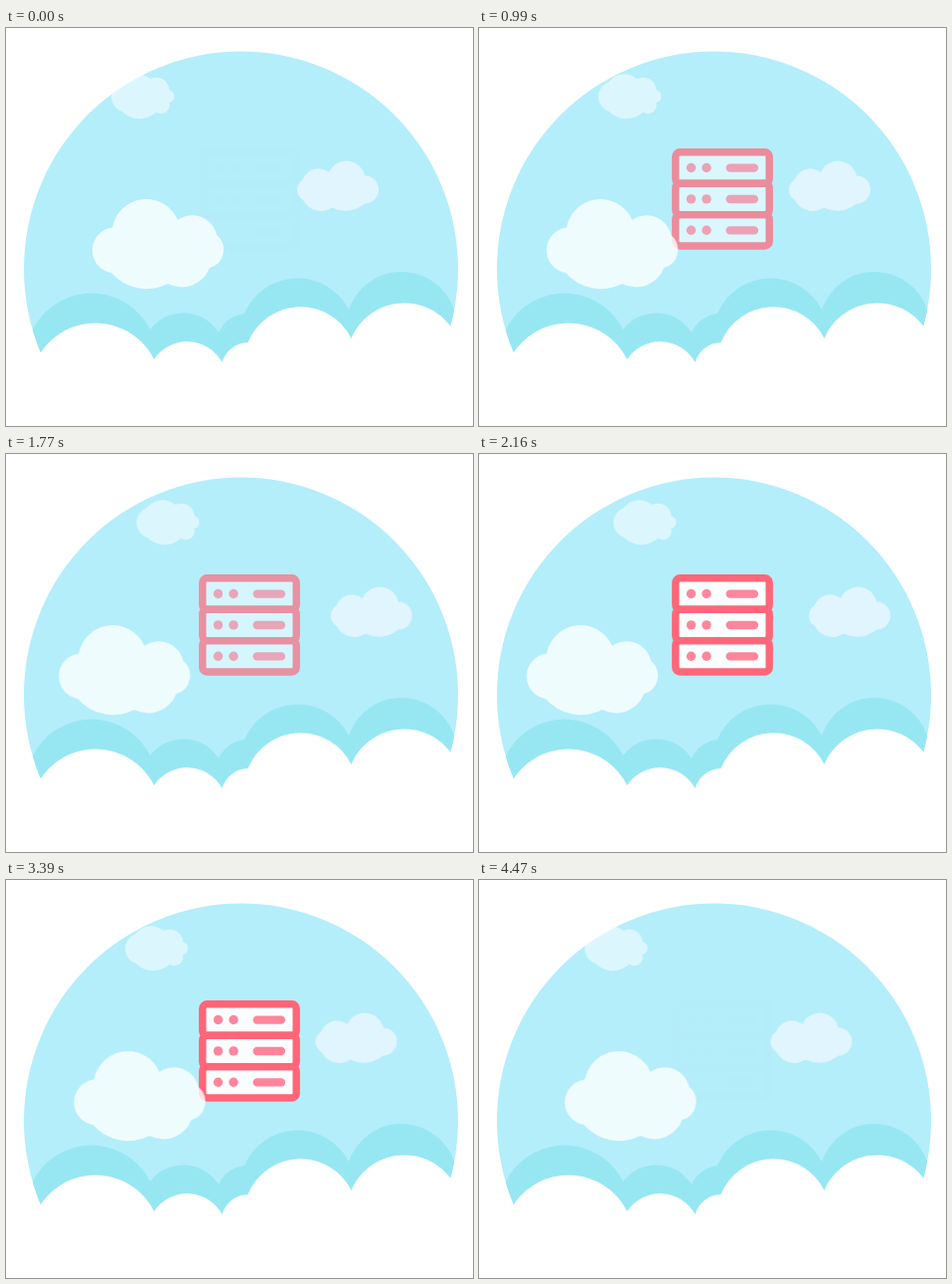
Recreate the animation shown at these times as an HTML page. Size 470 px wide and 400 px high, loop 4.5 s.

```html
<!DOCTYPE html>
<html lang="en">
<head>
<meta charset="utf-8">
<title>Server in the clouds</title>
<style>
  html, body { margin: 0; width: 100%; height: 100%; overflow: hidden; background: #fff; }
  svg { display: block; width: 470px; height: 400px; }

  .cloud { animation: drift 4.5s linear infinite; }
  .small { --dx: 30px; fill: #fff; fill-opacity: .52; }
  .right { --dx: 40px; fill: #e0f5fd; }
  .big { --dx: -40px; fill: #fff; fill-opacity: .79; }

  /* The panels fade inside the fading server, so they dim faster than the frame */
  .server, .panels { animation: pulse 4.5s ease-in-out infinite; }
  .panels { fill: #fbfeff; }
  .frame { fill: none; stroke: #ff6678; stroke-width: 7.4; }
  .lights { fill: #ff859b; }

  @keyframes drift {
    0%, 100% { transform: translateX(0); }
    46.67% { transform: translateX(var(--dx)); }
  }
  @keyframes pulse {
    0%, 100% { opacity: .01; }
    15%, 47%, 76% { opacity: 1; }
    31% { opacity: .32; }
    61% { opacity: .14; }
  }
</style>
</head>
<body>
<svg viewBox="0 0 470 400">
  <defs>
    <clipPath id="dome"><circle cx="236.5" cy="242" r="218.5"/></clipPath>
    <rect id="box" x="197.8" y="124.8" width="94.4" height="31.4" rx="4.5"/>
    <g id="unit">
      <use href="#box" class="frame"/>
      <g class="lights">
        <circle cx="213.5" cy="140.5" r="4.7"/>
        <circle cx="229" cy="140.5" r="4.7"/>
        <rect x="248.5" y="136.4" width="32.6" height="8.4" rx="4.2"/>
      </g>
    </g>
  </defs>

  <g clip-path="url(#dome)">
    <rect width="470" height="400" fill="#b4eefa"/>
    <path fill="#97e7f3" d="M20 333
      A66 66 0 0 1 145 303 A42 42 0 0 1 214 306 A32 32 0 0 1 240 287
      A58 58 0 0 1 345 283 A56 56 0 0 1 454 303 V400 H20z"/>
  </g>
  <path fill="#fff" d="M24 362
    A66 66 0 0 1 149 333 A40 40 0 0 1 217.5 336 A28 28 0 0 1 243.5 316
    A57 57 0 0 1 347.5 312 A58 58 0 0 1 459 334 V400 H24z"/>

  <g class="server">
    <g class="panels">
      <use href="#box"/>
      <use href="#box" y="31.4"/>
      <use href="#box" y="62.8"/>
    </g>
    <use href="#unit"/>
    <use href="#unit" y="31.4"/>
    <use href="#unit" y="62.8"/>
  </g>

  <path class="cloud small" d="M117 84
    A15.6 15.6 0 0 1 116 54.5 A20 20 0 0 1 145 51 A13.6 13.6 0 0 1 164.5 62.5
    A6.4 6.4 0 0 1 164 75 A8.5 8.5 0 0 1 151 84.5 A24 24 0 0 1 117 84z"/>
  <path class="cloud right" d="M299 173
    A12 12 0 0 1 298.5 152.5 A17 17 0 0 1 325 145 A19 19 0 0 1 361 148.5
    A14 14 0 1 1 361 176.5 A30 30 0 0 1 328 180.5 A20 20 0 0 1 299 173z"/>
  <path class="cloud big" d="M106 246
    A23 23 0 0 1 107 200.5 A34.7 34.7 0 0 1 173 193 A25 25 0 0 1 212 208
    A19 19 0 0 1 205 241 A30 30 0 0 1 163 257 A47 47 0 0 1 106 246z"/>
</svg>
</body>
</html>
```
